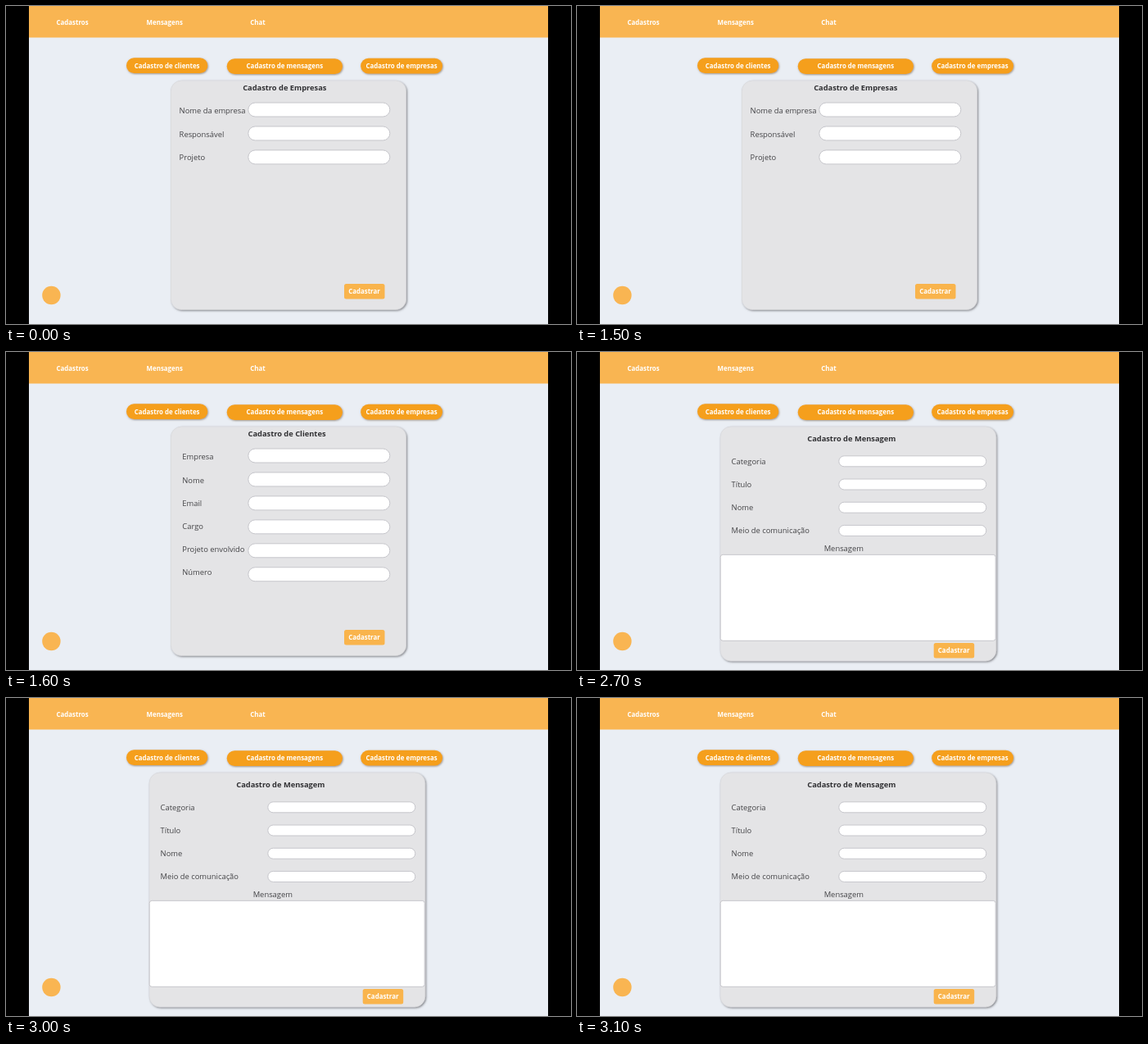
An HTML page that plays this animation: 690x388 px, repeating every 3.4 s.

```html
<!DOCTYPE html>
<html lang="pt">
<head>
<meta charset="utf-8">
<title>Cadastros</title>
<style>
  html, body { margin: 0; width: 100%; height: 100%; overflow: hidden; background: #000; }
  svg { display: block; width: 690px; height: 388px; }
  text { font-family: "Open Sans", "Noto Sans", sans-serif; }
  .small { font-size: 7.9px; font-weight: 700; fill: #fff; }
  .title { font-size: 9.3px; font-weight: 700; fill: #303033; }
  .label { font-size: 9.4px; fill: #434346; }
  .mid { text-anchor: middle; }
  .card { fill: #e4e4e6; stroke: #d6d6d9; stroke-width: .6; filter: url(#cardShadow); }
  .pill { fill: #f59f1c; filter: url(#pillShadow); }
  .field { fill: #fff; stroke: #c6c6cb; stroke-width: 1; }
  .send { fill: #f9b44c; }
</style>
</head>
<body>
<svg id="stage" viewBox="0 0 690 388">
  <defs>
    <filter id="cardShadow" x="-5%" y="-5%" width="110%" height="110%">
      <feDropShadow dx="1.2" dy="1.2" stdDeviation="1" flood-color="#55555a" flood-opacity=".65"/>
    </filter>
    <filter id="pillShadow" x="-10%" y="-30%" width="120%" height="170%">
      <feDropShadow dx=".7" dy=".9" stdDeviation=".9" flood-color="#6b5a48" flood-opacity=".65"/>
    </filter>
  </defs>
</svg>
<script>
const LOOP = 3400;
const stage = document.getElementById('stage');

function add(parent, tag, attrs, content) {
  const el = document.createElementNS('http://www.w3.org/2000/svg', tag);
  for (const key in attrs) el.setAttribute(key, attrs[key]);
  if (content) el.textContent = content;
  return parent.appendChild(el);
}

const text = (parent, cls, x, y, content) =>
  add(parent, 'text', { class: cls, x, y }, content);

const box = (parent, cls, x, y, width, height, rx) =>
  add(parent, 'rect', { class: cls, x, y, width, height, rx });

function sendButton(parent, x, y) {
  box(parent, 'send', x, y, 49.5, 18.5, 2.5);
  text(parent, 'small mid', x + 24.5, y + 12, 'Cadastrar');
}

function entryForm(title, labelX, labels) {
  const g = add(stage, 'g', {});
  box(g, 'card', 201.3, 91, 287.4, 279.5, 13);
  text(g, 'title mid', title[1], 103, title[0]);
  labels.forEach((label, i) => {
    text(g, 'label', labelX, 131.4 + i * 28.2, label);
    box(g, 'field', 295.8, 118 + i * 28.95, 173, 17, 8.5);
  });
  sendButton(g, 413, 339);
  return g;
}

function messageForm() {
  const g = add(stage, 'g', {});
  box(g, 'card', 175, 91, 336.8, 286, 13);
  text(g, 'title mid', 335.3, 108.6, 'Cadastro de Mensagem');
  ['Categoria', 'Título', 'Nome', 'Meio de comunicação'].forEach((label, i) => {
    text(g, 'label', 188.6, 136.8 + i * 28.2, label);
    box(g, 'field', 319.8, 126.8 + i * 28.2, 180, 13, 6.5);
  });
  text(g, 'label mid', 325.8, 243.2, 'Mensagem');
  box(g, 'field', 175.2, 247.3, 336, 105, 3);
  sendButton(g, 435.7, 355);
  return g;
}

add(stage, 'rect', { x: 28, y: 0, width: 634, height: 388, fill: '#eaeef4' });
add(stage, 'rect', { x: 28, y: 0, width: 634, height: 38.5, fill: '#f9b552' });
add(stage, 'circle', { cx: 55.4, cy: 353, r: 11.2, fill: '#f9b552' });

[['Cadastros', 61.5], ['Mensagens', 171.6], ['Chat', 298.3]]
  .forEach(([label, x]) => text(stage, 'small', x, 23, label));

[
  ['Cadastro de clientes', 147, 63.3, 99.3],
  ['Cadastro de mensagens', 269.7, 64.2, 141.3],
  ['Cadastro de empresas', 433.2, 63.8, 99.8]
].forEach(([label, x, y, w]) => {
  box(stage, 'pill', x, y, w, 18.8, 9.4);
  text(stage, 'small mid', x + w / 2, y + 12.2, label);
});

const scenes = [
  { until: 1600, view: entryForm(['Cadastro de Empresas', 340.3], 211.6,
      ['Nome da empresa', 'Responsável', 'Projeto']) },
  { until: 2700, view: entryForm(['Cadastro de Clientes', 343], 215.3,
      ['Empresa', 'Nome', 'Email', 'Cargo', 'Projeto envolvido', 'Número']) },
  { until: LOOP, view: messageForm() }
];

const start = performance.now();

function draw(now) {
  const t = Math.max(0, now - start) % LOOP;
  const current = scenes.find(scene => t < scene.until);
  for (const scene of scenes) {
    scene.view.style.display = scene === current ? '' : 'none';
  }
  requestAnimationFrame(draw);
}
draw(start);
</script>
</body>
</html>
```
